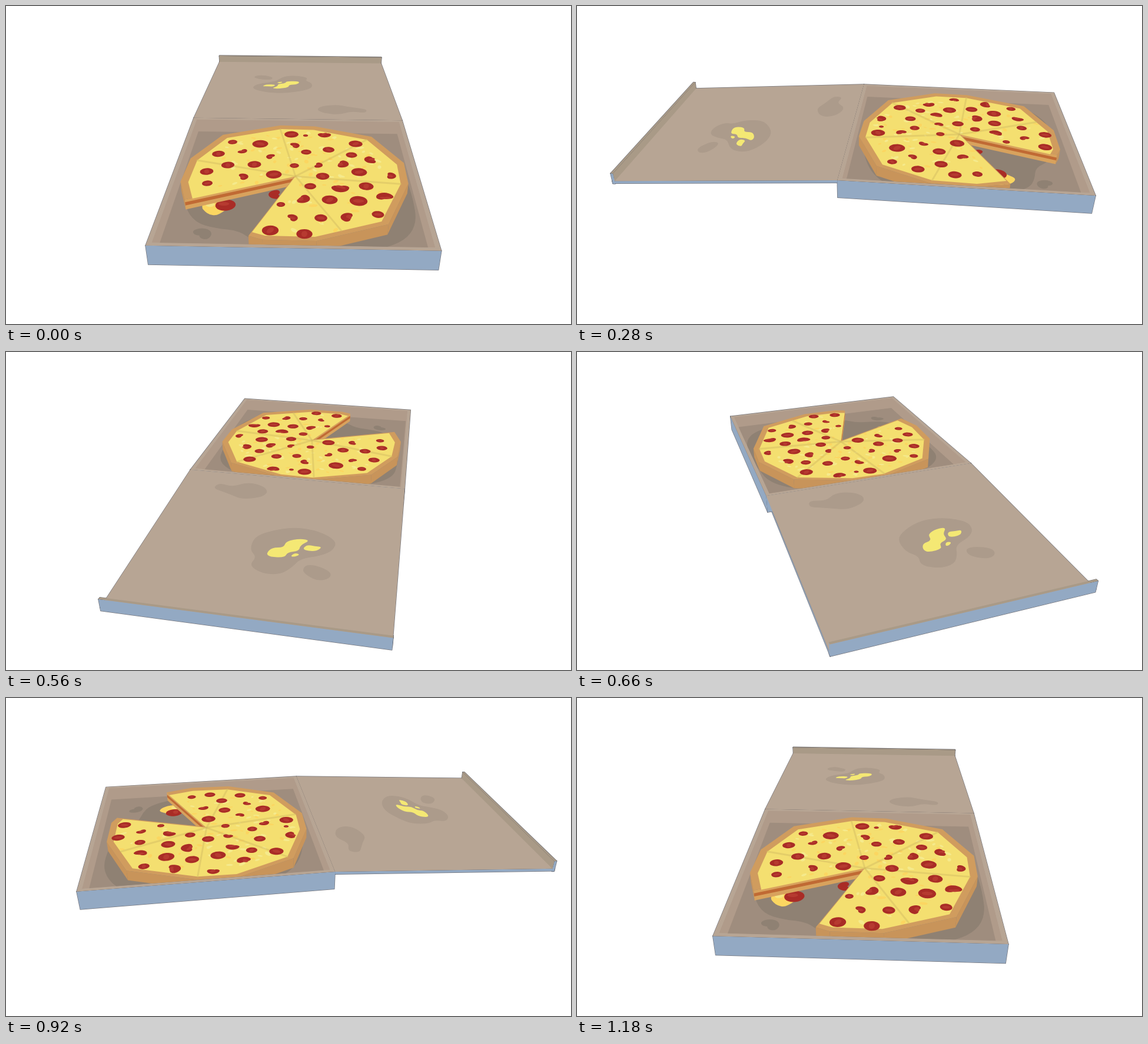
These frames come from a looping animation (960 px wide and 540 px high, 1200 ms). An HTML page with a canvas:

```html
<!DOCTYPE html>
<html lang="en">
<head>
<meta charset="utf-8">
<title>Pizza box turntable</title>
<style>
html, body { margin: 0; width: 100%; height: 100%; overflow: hidden; background: #fff; }
canvas { display: block; }
</style>
</head>
<body>
<canvas id="stage" width="960" height="540"></canvas>
<script>
const ctx = document.getElementById('stage').getContext('2d');
const SIN = 0.5, COS = 0.866, FOCAL = 1040, CX = 481, CY = 270;
const EYE = { x: -0.029, y: 1.025, z: 1.944 };
const RIM = 0.062, FLOOR = 0.015, TOP = 0.047;
const W = 0.377, FRONT = 0.7, HINGE = -0.056, END = -0.778, MID = 0.32;
const lidY = z => 0.066 + 0.072 * z;
const turnAt = step => (1.65 - 6.0865 * step) * Math.PI / 180;

let c = 1, s = 0;
function setTurn(angle) { c = Math.cos(angle); s = Math.sin(angle); }

function project([x, y, z]) {
  const X = x * c - z * s - EYE.x, Y = y - EYE.y, Z = x * s + z * c - EYE.z;
  const k = FOCAL / (-Y * SIN - Z * COS);
  return [CX + X * k, CY - (Y * COS - Z * SIN) * k];
}

// Model point under a screen position, on the plane y = h + slope * z
function pick(sx, sy, h, slope = 0) {
  const p = (sx - CX) / FOCAL, q = (sy - CY) / FOCAL;
  const dy = -SIN - q * COS, dz = -COS + q * SIN;
  const lx = p * c + dz * s, lz = -p * s + dz * c;
  const ox = EYE.x * c + EYE.z * s, oz = -EYE.x * s + EYE.z * c;
  const t = (h + slope * oz - EYE.y) / (dy - slope * lz);
  return [ox + t * lx, EYE.y + t * dy, oz + t * lz];
}
const pairs = list => list.flatMap((v, i) => i % 2 ? [] : [[v, list[i + 1]]]);
const pickAll = (list, h, slope) => pairs(list).map(([x, y]) => pick(x, y, h, slope));

function trace(points) {
  const path = points.map(project);
  ctx.beginPath();
  path.forEach(p => ctx.lineTo(...p));
  ctx.closePath();
  return path;
}
function fill(points, color) {
  trace(points);
  ctx.fillStyle = color;
  ctx.fill();
}
function blob(points, color) {
  const path = points.map(project);
  const half = (a, b) => [(a[0] + b[0]) / 2, (a[1] + b[1]) / 2];
  ctx.beginPath();
  ctx.moveTo(...half(path[path.length - 1], path[0]));
  path.forEach((p, i) => ctx.quadraticCurveTo(...p, ...half(p, path[(i + 1) % path.length])));
  ctx.fillStyle = color;
  ctx.fill();
}
function facing(points) {
  const p = points.map(project);
  return p.reduce((sum, a, i) => {
    const b = p[(i + 1) % p.length];
    return sum + a[0] * b[1] - b[0] * a[1];
  }, 0) > 0;
}
// Upright quad from a to b, left to right as seen from its visible side
const wall = ([ax, az], [bx, bz], top, bottom) =>
  [[ax, top, az], [bx, top, bz], [bx, bottom, bz], [ax, bottom, az]];
const flat = (corners, y) => corners.map(([x, z]) => [x, y, z]);
const rect = inset => [[-W + inset, FRONT - inset], [W - inset, FRONT - inset],
  [W - inset, HINGE + inset], [-W + inset, HINGE + inset]];

// Disc lying flat; a bite eats into it from one direction
function disc([x, y, z], r, bite, squash = 1, tilt = 0) {
  const points = [];
  for (let i = 0; i < 24; i++) {
    const a = i / 24 * 2 * Math.PI;
    const k = bite === undefined ? 1 : 1 - 0.8 * Math.max(0, Math.cos(a - bite * Math.PI / 180)) ** 1.5;
    const u = Math.cos(a) * r * k, v = Math.sin(a) * r * k * squash;
    points.push([x + u * Math.cos(tilt) - v * Math.sin(tilt), y, z + u * Math.sin(tilt) + v * Math.cos(tilt)]);
  }
  return points;
}

// Box shell
const BLUE = '#93a9c3', CARD = '#b7a594', WALL = '#b09b8a', FLAP = '#a99a87';
const outer = rect(0);
const slab = (x, z0, z1) => [[x, lidY(z0), z0], [x, lidY(z1), z1],
  [x, lidY(z1) - 0.009, z1], [x, lidY(z0) - 0.009, z0]];
const inEnd = END + 0.008;
const shell = [
  ...outer.map((p, i) => [wall(p, outer[(i + 1) % 4], RIM, 0), BLUE]),
  [slab(-W, END, HINGE), BLUE],
  [slab(W, HINGE, END), BLUE],
  [[[-W, lidY(END), END], [W, lidY(END), END], [W, RIM, HINGE], [-W, RIM, HINGE]], CARD],
  [wall([W, END], [-W, END], 0.038, 0), BLUE],
  [wall([-W, inEnd], [W, inEnd], 0.038, 0.01), FLAP],
  [wall([-W, END], [-W, inEnd], 0.038, 0), BLUE],
  [wall([W, inEnd], [W, END], 0.038, 0), BLUE],
  [flat([[-W, END], [W, END], [W, inEnd], [-W, inEnd]], 0.038), FLAP],
  [flat(outer, RIM).reverse(), CARD]
].map(([points, color]) => ({ points: points, color }));
shell[shell.length - 1].points.reverse();
const rim = shell.pop();

// Lid marks, laid out from the view with the lid in front
setTurn(turnAt(28));
const lidMark = (color, list) => ({ color, points: pickAll(list, 0.066, 0.072) });
const GREASE = '#ac9b8b', MELT = '#f4e874';
const lidMarks = [
  lidMark(GREASE, [414, 336, 422, 314, 448, 304, 490, 297, 532, 304, 562, 321, 556, 337, 535, 346,
    500, 351, 487, 365, 466, 378, 434, 376, 413, 362, 426, 348]),
  lidMark(GREASE, [503, 371, 510, 361, 530, 363, 553, 374, 550, 385, 530, 389, 512, 380]),
  lidMark(GREASE, [352, 231, 362, 222, 385, 229, 410, 221, 437, 227, 446, 238, 433, 247, 400, 250, 382, 242, 365, 236]),
  lidMark(MELT, [442, 342, 452, 332, 472, 332, 476, 321, 500, 317, 517, 320, 500, 328, 498, 338,
    478, 340, 474, 349, 448, 348]),
  lidMark(MELT, [503, 336, 511, 327, 525, 330, 538, 331, 526, 339]),
  lidMark(MELT, [483, 347, 491, 341, 500, 344, 490, 348])
];

// Pizza, laid out from the opening view
setTurn(turnAt(0));
const ring = pairs([-.298, .135, -.326, .044, -.32, -.091, -.241, -.25, -.056, -.324, .059, -.32, .241, -.25,
  .323, -.082, .32, .036, .242, .235, .058, .31, -.075, .309, -.111, .294]);
const sized = k => [[0, MID], ...ring.map(([x, z]) => [x * k, MID + z * k])];
const cheese = flat(sized(1), TOP), crust = sized(1.07), crustTop = flat(crust, 0.05);
const cuts = pairs([-.32, -.091, -.06, -.322, .24, -.25, .32, .036, .129, .28]);

const whole = [[385,231,.65],[432,234,1.1],[361,251,.85],[377,270,.85],[341,281,.85],[342,301,.65],[422,269,.88],
  [455,286,1],[485,218,1],[509,220,.35],[510,248,.7],[490,271,.6],[548,244,.8],[594,234,.95],[587,253,.75],
  [600,282,1],[538,289,.84],[612,306,.9],[517,306,.72],[550,329,.94],[599,331,1.05],[632,354,.7],
  [535,360,.72],[467,337,.5],[449,381,.92],[507,387,.88]];
const bitten = [[401,246,.7,230],[401,290,.8,160],[451,256,.7,30],[541,218,.95,270],[489,237,.8,150],
  [621,261,.95,-20],[570,268,.95,200],[652,288,.8,190],[568,308,1.1,270],[503,327,.95,210],
  [644,325,1.05,80],[582,359,.9,20],[485,360,.72,150],[529,270,.7,200]];
const pepperoni = [...whole, ...bitten].map(([x, y, k, bite]) => {
  const at = pick(x, y, TOP);
  return { edge: disc(at, 0.0245 * k, bite), shine: disc(at, 0.015 * k, bite, 0.6, k * 9) };
});

let seed = 7;
const random = () => (seed = seed * 16807 % 2147483647) / 2147483647;
const flecks = [];
while (flecks.length < 110) {
  const a = random() * 2 * Math.PI, r = 0.305 * Math.sqrt(random());
  const deg = a * 180 / Math.PI;
  const size = 0.006 + 0.007 * random(), tilt = random() * 3;
  if (deg > 108 && deg < 158) continue;
  flecks.push({
    points: disc([r * Math.cos(a), TOP, MID + r * Math.sin(a)], size, undefined, 0.55, tilt),
    color: flecks.length % 2 ? '#f5ea8c' : '#fbd661'
  });
}

const SHADE = '#8f8173', RED = '#a92c26', RED_LIGHT = '#b63a30';
const grease = pairs([-.28, .21, -.325, .13, -.35, -.02, -.33, -.26, 0, -.36, .32, -.26, .36, 0, .345, .25,
  .2, .34, 0, .33, -.1, .3, -.15, .245, -.22, .235]).map(([x, z]) => [x, FLOOR, MID + z]);
const crumb = disc(pick(331, 388, FLOOR), 0.029, 130);
const melt = pickAll([332, 342, 337, 329, 355, 331, 372, 330, 380, 342, 368, 350, 357, 356, 345, 354, 338, 349], FLOOR);
const meltLight = disc(pick(347, 337, FLOOR), 0.013);
const stray = disc(pick(373, 338, FLOOR), 0.03), strayShine = disc(pick(370, 336, FLOOR), 0.016, undefined, 0.6);
const scrap = disc(pick(460, 320, FLOOR), 0.025, 0);

function drawPizza() {
  blob(melt, '#fbd661');
  fill(meltLight, '#f5e583');
  fill(stray, RED);
  fill(strayShine, RED_LIGHT);
  fill(scrap, RED);
  crust.forEach((p, i) => {
    const next = crust[(i + 1) % crust.length];
    const side = wall(next, p, 0.05, FLOOR);
    if (!facing(side)) return;
    const cut = i === 0 || i === crust.length - 1;
    fill(side, cut ? '#d8a25d' : '#c8945a');
    if (cut) fill(wall(next, p, 0.04, 0.029), '#c06a34');
  });
  fill(crustTop, '#d09c5e');
  fill(cheese, '#f4df70');
  flecks.forEach(f => fill(f.points, f.color));
  ctx.strokeStyle = 'rgba(214,190,98,.5)';
  ctx.lineWidth = 3;
  for (const [x, z] of cuts) {
    trace([[0, TOP, MID], [x, TOP, MID + z]]);
    ctx.stroke();
  }
  for (const p of pepperoni) {
    fill(p.edge, RED);
    fill(p.shine, RED_LIGHT);
  }
}

function draw() {
  const time = performance.now() % 1200;
  setTurn(turnAt(Math.floor(time / 20 + 0.02) % 60));
  ctx.fillStyle = '#fff';
  ctx.fillRect(0, 0, 960, 540);

  const visible = [...shell.filter(f => facing(f.points)), rim];
  ctx.strokeStyle = 'rgba(45,45,55,.65)';
  ctx.lineWidth = 1.4;
  ctx.lineJoin = 'round';
  for (const f of visible) {
    trace(f.points);
    ctx.stroke();
  }
  visible.forEach(f => fill(f.points, f.color));
  lidMarks.forEach(m => blob(m.points, m.color));

  ctx.save();
  trace(flat(rect(0.013), RIM));
  ctx.clip();
  ctx.fillStyle = WALL;
  ctx.fill();
  fill(flat(rect(0.016), FLOOR), '#9f8d7e');
  blob(grease, SHADE);
  fill(crumb, SHADE);
  drawPizza();
  ctx.restore();
  requestAnimationFrame(draw);
}
draw();
</script>
</body>
</html>
```
